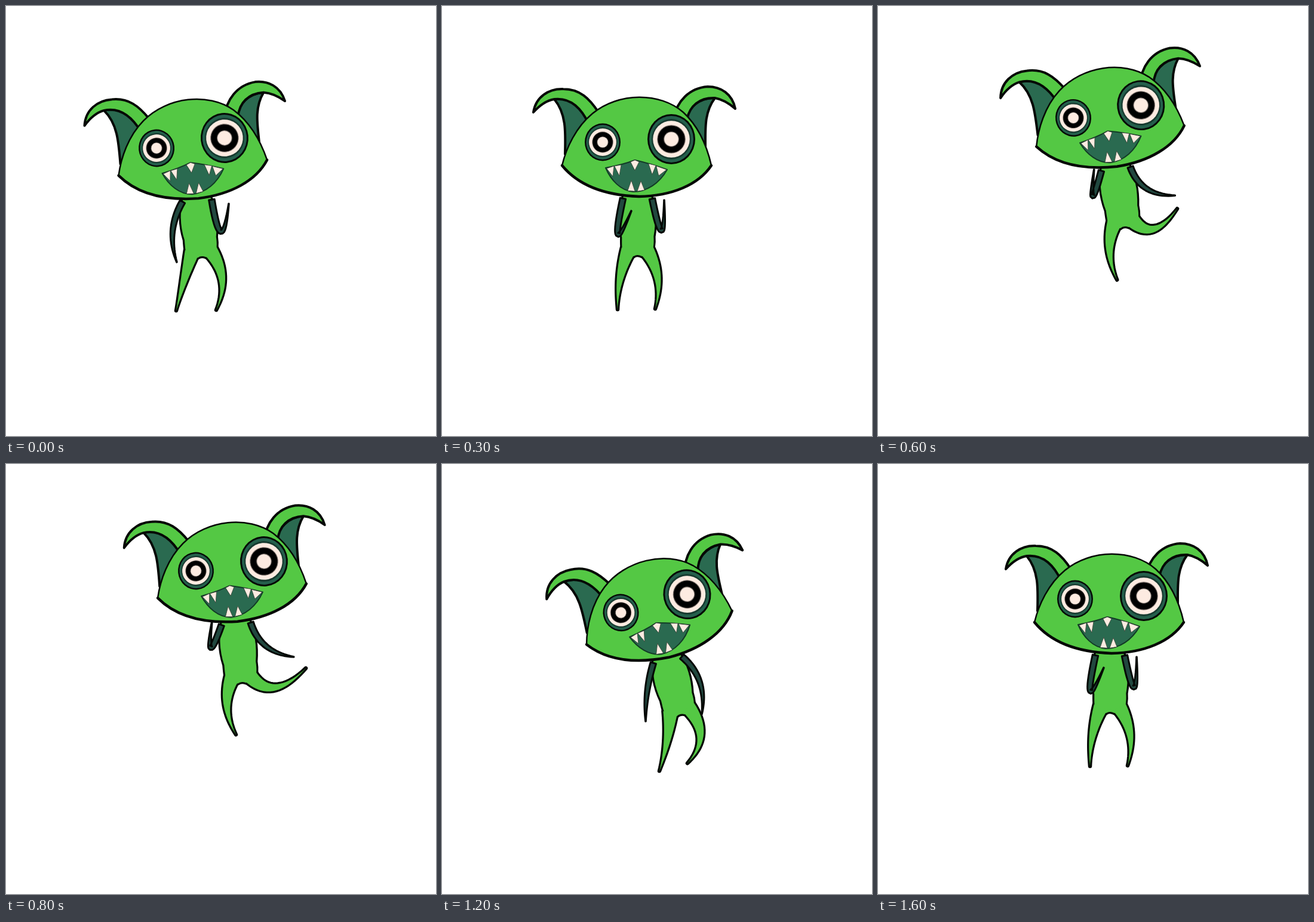
An HTML page with a canvas that plays this animation: 720 px wide and 720 px high, repeating every 1.7 s.

```html
<!DOCTYPE html>
<html>
<head>
<meta charset="utf-8">
<style>
html, body { margin: 0; width: 100%; height: 100%; overflow: hidden; background: #fff; }
canvas { display: block; width: 720px; height: 720px; }
</style>
</head>
<body>
<canvas id="stage" width="720" height="720"></canvas>
<script>
const ctx = document.getElementById('stage').getContext('2d');
const GREEN = '#54c844', TEAL = '#2a6a50', SLEEVE = '#21483f', CREAM = '#fdebe1', INK = '#050805';
const STEP = 100, STEPS = 17;
const HEAD_X = 326.5, HEAD_Y = 225.5;

// Pose: head x, y, degrees; crotch; elbow + hand (left, right); knee + foot (left, right)
const stand = [309, 229.5, -6, 327, 420, 279, 378, 286, 429, 361, 378, 373, 331, 300, 452, 285, 510, 362, 460, 352, 509];
const ready = [326.5, 225.5, 0, 327, 418, 296, 383, 317, 343, 368, 376, 372, 325, 299, 452, 294, 508, 361, 455, 357, 507];
const kick = [317.5, 194, -15.8, 373, 383, 317, 350, 320, 306, 388, 302, 452, 300, 349, 412, 354, 475, 402, 378, 406, 332];
const leap = [375, 171, -5.5, 394, 366, 343, 308, 345, 263, 427, 297, 482, 323, 370, 402, 385, 453, 427, 370, 502, 342];
const lean = [330, 237.5, -31.6, 432, 400, 374, 393, 414, 409, 437, 341, 466, 387, 412, 442, 412, 500, 481, 426, 461, 466];
const land = [355, 233.5, -13, 399, 420, 343, 385, 341, 431, 426, 352, 435, 419, 378, 456, 364, 514, 432, 462, 411, 501];

const mix = (a, b, k) => a.map((v, i) => v + (b[i] - v) * k);
const shift = (p, dx, dy) => p.map((v, i) => i === 2 ? v : v + ((i < 2 ? i === 0 : i % 2 === 1) ? dx : dy));

const keys = [
  [0, stand], [3, ready], [5, kick], [6, shift(mix(kick, leap, 0.75), 23, 0)],
  [8, leap], [10, lean], [12, land], [16, shift(ready, 61, -2)]
];

function poseAt(step) {
  const i = Math.max(1, keys.findIndex(k => k[0] >= step));
  const [s0, a] = keys[i - 1], [s1, b] = keys[i];
  return mix(a, b, (step - s0) / (s1 - s0));
}

const shape = d => new Path2D(d);
const torso = shape('M-22-4C-31 18-32 45-26 70C-26 85-26 92-22 98L-6 101Q0 97 8 101L22 98C27 90 28 80 27 68C31 45 30 18 20-4Z');
const skull = shape('M201 267C208 238 224 203 252 180C296 144 365 144 404 178C430 202 444 236 451 267C429 300 384 318 330 319C272 317 228 300 201 267Z');
const jaw = shape('M201 267C228 300 272 317 330 319C384 318 429 300 451 267');
const ears = [
  {
    skin: shape('M153 178C157 152 179 138 203 139C231 139 247 155 262 178L246 198C233 170 215 153 188 156Q170 159 153 178Z'),
    hollow: shape('M188 156C215 153 233 168 244 193L206 248C207 210 208 180 188 156Z')
  },
  {
    skin: shape('M491 172C486 147 467 135 445 135C414 137 393 160 388 188L410 190C415 167 431 153 457 154Q474 157 491 172Z'),
    hollow: shape('M457 154C431 153 411 171 409 190L441 238C441 205 439 178 457 154Z')
  }
];
const mouth = shape('M274 271Q302 266 323 258Q350 264 377 274C364 297 343 311 320 311C299 309 283 292 274 271Z');
const teeth = shape('M276 272L288 268L286 285ZM289 268L300 266L297 284ZM316 261L323 258L330 261L323 275ZM346 264L358 267L352 282ZM359 268L376 274L363 284ZM311 309L317 292L323 310ZM327 310L333 293L339 308Z');

function paint(path, fill, width, line = INK) {
  ctx.fillStyle = fill;
  ctx.fill(path);
  outline(path, width, line);
}

function outline(path, width, line = INK) {
  ctx.lineWidth = width;
  ctx.strokeStyle = line;
  ctx.stroke(path);
}

function disc(x, y, rx, ry, fill) {
  ctx.beginPath();
  ctx.ellipse(x, y, rx, ry, 0, 0, Math.PI * 2);
  ctx.fillStyle = fill;
  ctx.fill();
}

function eye(x, y, r) {
  disc(x, y, r + 1, r * 1.05 + 1, INK);
  disc(x, y, r * 0.95, r, '#24604c');
  disc(x, y, r * 0.85, r * 0.87, '#173b30');
  disc(x, y, r * 0.79, r * 0.79, CREAM);
  disc(x, y, r * 0.61, r * 0.61, '#786e69');
  disc(x, y, r * 0.58, r * 0.58, '#000');
  disc(x, y, r * 0.33, r * 0.33, '#786e69');
  disc(x, y, r * 0.3, r * 0.3, CREAM);
}

// Tapered curve from a through b to c
function limb(a, b, c, width) {
  const d1 = Math.hypot(b[0] - a[0], b[1] - a[1]);
  const d2 = Math.hypot(c[0] - b[0], c[1] - b[1]);
  const k = d1 / (d1 + d2);
  const q = [0, 1].map(i => (b[i] - (1 - k) ** 2 * a[i] - k * k * c[i]) / (2 * k * (1 - k)));
  const left = [], right = [], n = 20;
  for (let i = 0; i <= n; i++) {
    const t = i / n, u = 1 - t;
    const [x, y] = [0, 1].map(j => u * u * a[j] + 2 * u * t * q[j] + t * t * c[j]);
    const [vx, vy] = [0, 1].map(j => u * (q[j] - a[j]) + t * (c[j] - q[j]));
    const s = width(t) / (Math.hypot(vx, vy) || 1);
    left.push([x - vy * s, y + vx * s]);
    right.unshift([x + vy * s, y - vx * s]);
  }
  const path = new Path2D();
  left.concat(right).forEach(p => path.lineTo(...p));
  path.closePath();
  return path;
}

const legWidth = t => 12 * (1 - t) ** 1.2;
const armWidth = t => 4.5 * (1 - t * t) + 0.3;

function drawBody(p, angle) {
  const cos = Math.cos(angle), sin = Math.sin(angle);
  const neck = [p[0] + 1.5 * cos - 92 * sin, p[1] + 1.5 * sin + 92 * cos];
  const dx = p[3] - neck[0], dy = p[4] - neck[1], len = Math.hypot(dx, dy);
  const ax = dx / len, ay = dy / len;
  const local = (u, v) => [neck[0] + ay * u + ax * v, neck[1] - ax * u + ay * v];
  const joint = i => [p[i], p[i + 1]];

  const trunk = new Path2D();
  trunk.addPath(torso, new DOMMatrix([ay, -ax, dx / 100, dy / 100, neck[0], neck[1]]));
  const parts = [
    trunk,
    limb(local(-15, len - 9), joint(13), joint(15), legWidth),
    limb(local(16, len - 9), joint(17), joint(19), legWidth)
  ];
  parts.forEach(part => outline(part, 6.5));
  ctx.fillStyle = GREEN;
  parts.forEach(part => ctx.fill(part));
  paint(limb(local(-25, 5), joint(5), joint(7), armWidth), SLEEVE, 3);
  paint(limb(local(24, 5), joint(9), joint(11), armWidth), SLEEVE, 3);
}

function drawHead(x, y, angle) {
  ctx.save();
  ctx.translate(x, y);
  ctx.rotate(angle);
  ctx.translate(-HEAD_X, -HEAD_Y);
  for (const ear of ears) {
    paint(ear.hollow, TEAL, 4);
    paint(ear.skin, GREEN, 4);
  }
  paint(skull, GREEN, 2.5);
  outline(jaw, 4.5);
  eye(269, 228, 29);
  eye(384, 223, 39);
  paint(mouth, TEAL, 2, '#123a26');
  paint(teeth, CREAM, 0.8, '#3b4a3c');
  ctx.restore();
}

function frame(now) {
  const pose = poseAt(Math.floor(now / STEP) % STEPS);
  const angle = pose[2] * Math.PI / 180;
  ctx.fillStyle = '#fff';
  ctx.fillRect(0, 0, 720, 720);
  ctx.lineJoin = ctx.lineCap = 'round';
  drawBody(pose, angle);
  drawHead(pose[0], pose[1], angle);
  requestAnimationFrame(frame);
}
frame(performance.now());
</script>
</body>
</html>
```
